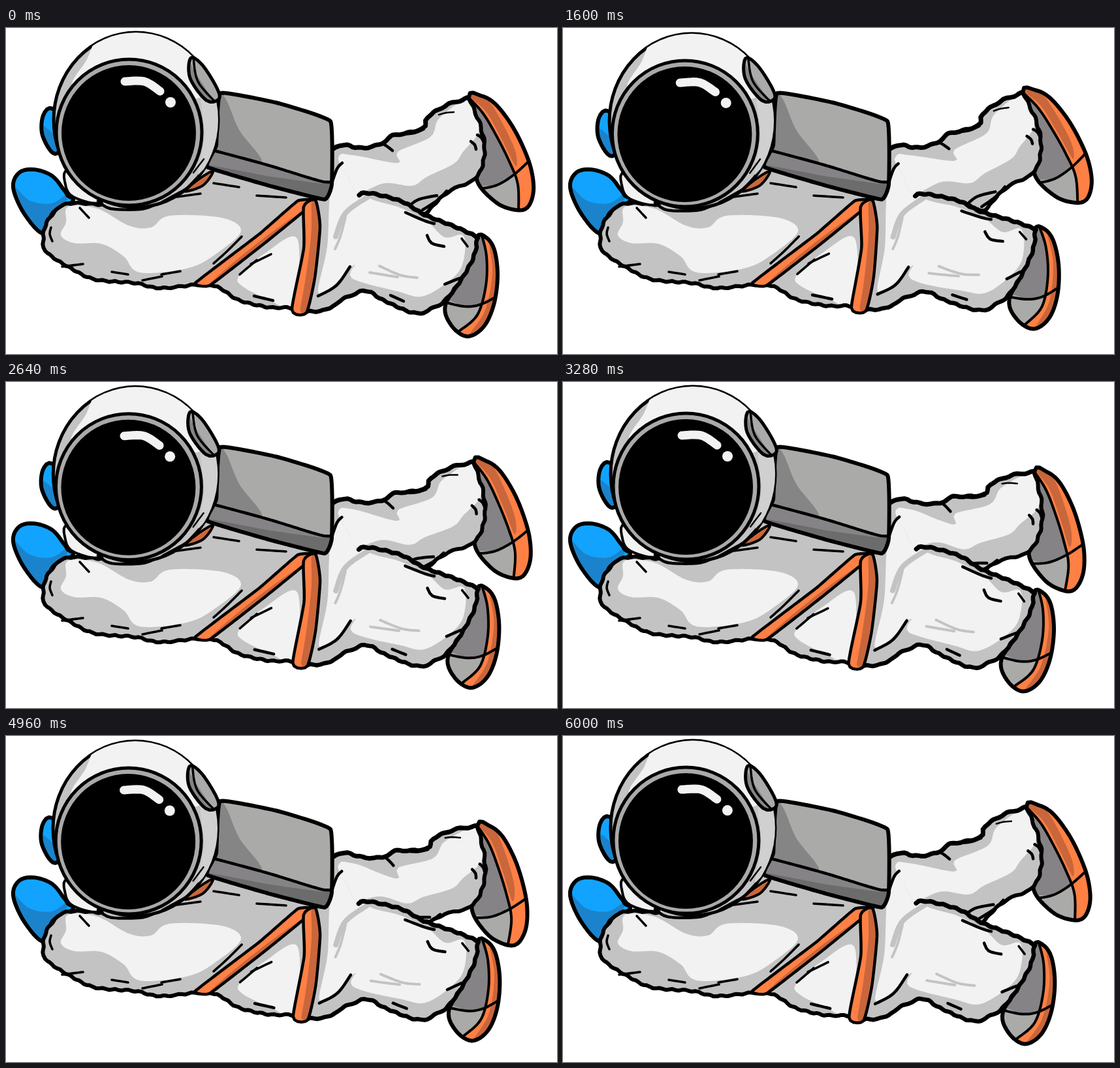
Recreate the animation shown at these times as an HTML page with a canvas. Size 844x500 px, loop 6080 ms.

```html
<!DOCTYPE html>
<html lang="en">
<head>
<meta charset="utf-8">
<title>Floating astronaut</title>
<style>
html, body { margin: 0; width: 100%; height: 100%; overflow: hidden; background: #fff; }
canvas { display: block; }
</style>
</head>
<body>
<canvas id="stage" width="844" height="500"></canvas>
<script>
const ctx = document.getElementById('stage').getContext('2d');
const LOOP = 6080, STEP = 80;
const SUIT = '#f2f2f2', SHADE = '#c3c3c3', INK = '#000';
const GREY = '#aaaaa9', MID = '#868386', DARK = '#6c6c6c';
const ORANGE = '#ff8044', RUST = '#c9663b', BLUE = '#12a3ff', NAVY = '#1b83cb';

// Turning points of the two kicking legs: [time, value]
const BACK_KICK = [[0, 0], [750, -8.6], [4200, 16], [LOOP, 0]];
const FRONT_KICK = [[0, 0], [1720, 1.03], [3600, -.38], [5150, .6], [LOOP, 0]];

function swing(keys, t) {
  const i = keys.findIndex(k => k[0] > t);
  const [t0, a] = keys[i - 1], [t1, b] = keys[i];
  return a + (b - a) * (t - t0) / (t1 - t0);
}

function ramp(v, from, to) {
  const u = Math.min(1, Math.max(0, (v - from) / (to - from)));
  return u * u * (3 - 2 * u);
}

function turn([x, y], cx, cy, degrees) {
  const a = degrees * Math.PI / 180, c = Math.cos(a), s = Math.sin(a);
  return [cx + (x - cx) * c - (y - cy) * s, cy + (x - cx) * s + (y - cy) * c];
}

let back = 0, front = 0;
const bend = {
  none: p => p,
  head: p => turn(p, 315, 270, -.9 * Math.max(0, front)),
  back: p => turn(p, 529, 202, back * ramp(p[0], 500, 570)),
  body: p => {
    const [x, y] = turn(p, 582, 300, -5.2 * front * ramp(p[0], 470, 640));
    const belly = front * ramp(y, 280, 430) * ramp(x, 300, 450) * (1 - ramp(x, 470, 560));
    return [x + 4 * belly, y - 3 * belly];
  }
};
let pose = bend.none;

// Hand-drawn waver that depends on the place alone, so shared edges agree
const waver = (x, y, size) => [
  x + size * Math.sin(x * .13 - y * .29),
  y + size * Math.sin(x * .31 + y * .17)
];

// Smooth path through a few points, sampled finely enough to bend
function trace(text, { closed = true, round = 1, rough = 0 } = {}) {
  const pts = text.split(' ').map(p => p.split(',').map(Number));
  const n = pts.length;
  const at = i => closed ? pts[(i + n) % n] : pts[Math.min(n - 1, Math.max(0, i))];
  ctx.beginPath();
  for (let i = 0; i < (closed ? n : n - 1); i++) {
    const [a, b, c, d] = [at(i - 1), at(i), at(i + 1), at(i + 2)];
    const steps = Math.ceil(Math.hypot(c[0] - b[0], c[1] - b[1]) / 5);
    for (let s = 0; s <= steps; s++) {
      const u = s / steps, e = u * u * (3 - 2 * u);
      const mix = k => {
        const out = (c[k] - a[k]) * round / 2, into = (d[k] - b[k]) * round / 2;
        const straight = b[k] + (c[k] - b[k]) * (round ? e : u);
        return straight + u * (1 - u) * ((1 - u) * out - u * into);
      };
      ctx.lineTo(...pose(waver(mix(0), mix(1), rough)));
    }
  }
  if (closed) ctx.closePath();
}

function ink(width, color = INK) {
  if (!width) return;
  ctx.lineWidth = width;
  ctx.strokeStyle = color;
  ctx.stroke();
}

function fill(text, color, style) {
  trace(text, style);
  ctx.fillStyle = color;
  ctx.fill();
}

function line(text, width = 4, color = INK, rough = 0) {
  trace(text, { closed: false, rough });
  ink(width, color);
}

const folds = (texts, width, color) => texts.forEach(text => line(text, width, color));

// Filled form, shading kept inside, then its ink edge
function form(text, color, width, shading, style) {
  fill(text, color, style);
  ctx.save();
  ctx.clip();
  shading();
  ctx.restore();
  trace(text, style);
  ink(width);
}

function oval(x, y, rx, ry, color, width) {
  ctx.beginPath();
  ctx.ellipse(...pose([x, y]), rx, ry, 0, 0, 7);
  ctx.fillStyle = color;
  ctx.fill();
  ink(width);
}

// Boot: toe below the seam, stripe along the sole
function boot(outline, seam, sole, toe, stripe, rust) {
  form(outline, MID, 6, () => {
    fill(seam + ' ' + toe, GREY);
    fill(sole + ' ' + stripe, ORANGE, { round: .6 });
    fill(rust, RUST);
    line(sole);
    line(seam);
  });
}

function gloves() {
  pose = bend.head;
  form('72,124 57,134 56,165 76,193 100,160', BLUE, 6, () =>
    fill('50,150 68,158 84,180 80,205 50,190', NAVY));
  pose = bend.none;
  form('11,245 20,222 43,217 71,227 90,250 103,265 72,283 57,315 28,285', BLUE, 6, () => {
    fill('5,236 35,264 70,269 96,254 82,285 62,325 15,285', NAVY);
    line('89,248 94,258 103,262');
  });
}

function backLeg() {
  pose = bend.back;
  boot('709,106 728,104 749,116 772,145 790,178 804,215 808,250 799,275 780,279 750,267 721,232 732,185',
    '724,247 752,241 778,225 801,204', '705,103 730,130 751,165 771,205 784,240 785,285',
    '830,280 760,300', '840,285 825,160 730,85', '705,100 735,128 760,172 781,212 777,180 738,110');

  const top = '500,188 515,179 545,184 576,177 590,166 637,155 646,138 671,120 709,107';
  const cuff = '709,107 727,151 733,190 721,229 676,252 642,284 620,276';
  form(top + ' ' + cuff + ' 560,280 510,265', SHADE, 0, () =>
    fill('508,200 530,195 600,207 600,190 650,167 664,138 709,110 725,155 700,190 686,208 645,228 622,242 580,238 540,254 495,262', SUIT),
    { rough: 1 });
  line(top, 7, INK, 1);
  line(cuff, 6, INK, 1);
  folds(['576,177 583,181 592,188', '608,163 625,161 640,155', '712,174 718,179 720,186', '722,164 728,168 733,178',
    '615,275 632,263 660,257', '638,279 661,264 675,250'], 4.5);
  line('663,133 674,130 686,129', 2.5);
}

function body() {
  pose = bend.body;
  boot('720,322 735,321 748,340 753,380 747,425 731,459 706,473 682,456 673,425 700,380',
    '670,420 702,427 727,424 755,410', '728,315 736,350 735,395 722,440 694,465',
    '750,470 670,480', '700,490 775,450 760,310', '740,325 745,375 733,435 704,480 765,440 758,340');

  const thigh = '540,257 556,253 605,266 640,286 690,306 722,321';
  const leg = '722,321 715,355 683,407 655,429 626,437 578,417 552,403 520,414 490,432 460,435';
  const arm = '460,435 430,429 400,428 355,417 312,394 236,399 197,391 138,386 100,369 63,345 57,320 65,293 92,270 147,271';
  form([thigh, leg, arm].join(' ') + ' 220,250 310,210 490,195 510,206', SHADE, 0, () => {
    fill('95,274 140,277 188,303 222,306 250,288 330,291 360,311 325,344 280,368 205,375 180,350 146,331 105,330 84,318 92,298', SUIT);
    fill('357,380 396,346 446,323 440,425 400,415 362,396', SUIT);
    fill('515,210 550,257 605,276 646,298 672,321 700,318 702,350 688,380 640,411 600,404 530,384 534,363 500,396 478,405 492,335 497,250', SUIT);
    line('556,258 520,284 505,320', 8, SHADE);
  }, { rough: 1 });
  line(thigh, 7, INK, 1);
  line(leg, 6.5, INK, 1);
  line(arm, 6, INK, 1);
  folds(['515,207 507,216 497,244', '612,283 642,296 656,300', '478,411 506,395 527,366', '645,318 652,330 671,335',
    '672,393 694,384', '589,410 609,419', '380,411 409,418'], 4.5);
  folds(['698,323 707,335', '358,378 384,356', '375,362 406,347', '318,361 338,343 361,320', '318,238 357,244',
    '384,257 429,260', '262,259 298,254', '113,276 127,291', '69,306 67,316 71,327', '86,366 118,362',
    '162,374 187,378', '209,387 239,381', '238,378 267,373'], 3.6);
  folds(['520,290 512,320 504,339', '572,365 604,379 630,383', '557,375 600,382'], 4, SHADE);

  form('447,265 475,265 400,327 312,395 290,391 388,316', ORANGE, 4.5, () =>
    fill('475,268 390,326 304,400 330,400 480,280', RUST), { round: .3 });
  form('456,274 474,264 481,305 473,383 460,437 438,432 456,338', ORANGE, 4.5, () =>
    line('473,270 473,315 465,380 456,432', 11, RUST), { round: .6 });
  form('273,250 304,226 317,221 301,242', ORANGE, 4, () => line('275,254 312,228', 7, RUST));
}

function pack() {
  pose = bend.none;
  form('328,100 416,115 497,143 499,240 488,263 400,241 308,213 322,180', GREY, 6, () => {
    fill('316,95 336,108 357,156 391,208 310,195', '#858585');
    fill('305,185 400,210 487,235 505,232 490,275 300,220', MID, { round: .4 });
    fill('305,210 400,227 487,239 505,232 490,275', DARK, { round: .4 });
    line('315,187 400,210 487,236 500,231', 4.5);
  }, { round: .3 });
}

function helmet() {
  pose = bend.head;
  form('96,218 91,240 103,259 143,268 160,240', SUIT, 4, () => {});
  line('141,265 160,277 205,278 226,272', 4.5);
  oval(199, 141, 126, 134, SHADE, 5);
  ctx.save();
  ctx.clip();
  fill('156,0 124,48 108,95 250,80 293,108 330,60 250,-5', SUIT);
  fill('300,100 335,100 325,185 295,225 304,165', '#d0d0d0');
  folds(['303,201 287,222', '308,213 283,239', '276,246 239,266'], 2.5);
  ctx.restore();
  oval(188.5, 160, 111.5, 112, GREY, 5);
  oval(188, 161, 103, 104, INK);
  line('182,82 212,82 236,97', 13, SUIT);
  oval(252, 114, 8, 8, SUIT);
  form('283,46 301,57 323,92 326,109 307,111 282,77', GREY, 5, () => {
    fill('275,40 288,65 320,120 278,95', '#858585');
    line('287,46 294,82 321,114', 3.5);
  });
}

function draw(now) {
  const t = Math.floor(now % LOOP / STEP) * STEP;
  back = swing(BACK_KICK, t);
  front = swing(FRONT_KICK, t);
  ctx.fillStyle = '#fff';
  ctx.fillRect(0, 0, 844, 500);
  ctx.lineCap = ctx.lineJoin = 'round';
  [gloves, backLeg, body, pack, helmet].forEach(part => part());
}

const start = performance.now();
function tick() {
  draw(performance.now() - start);
  requestAnimationFrame(tick);
}
tick();
</script>
</body>
</html>
```
